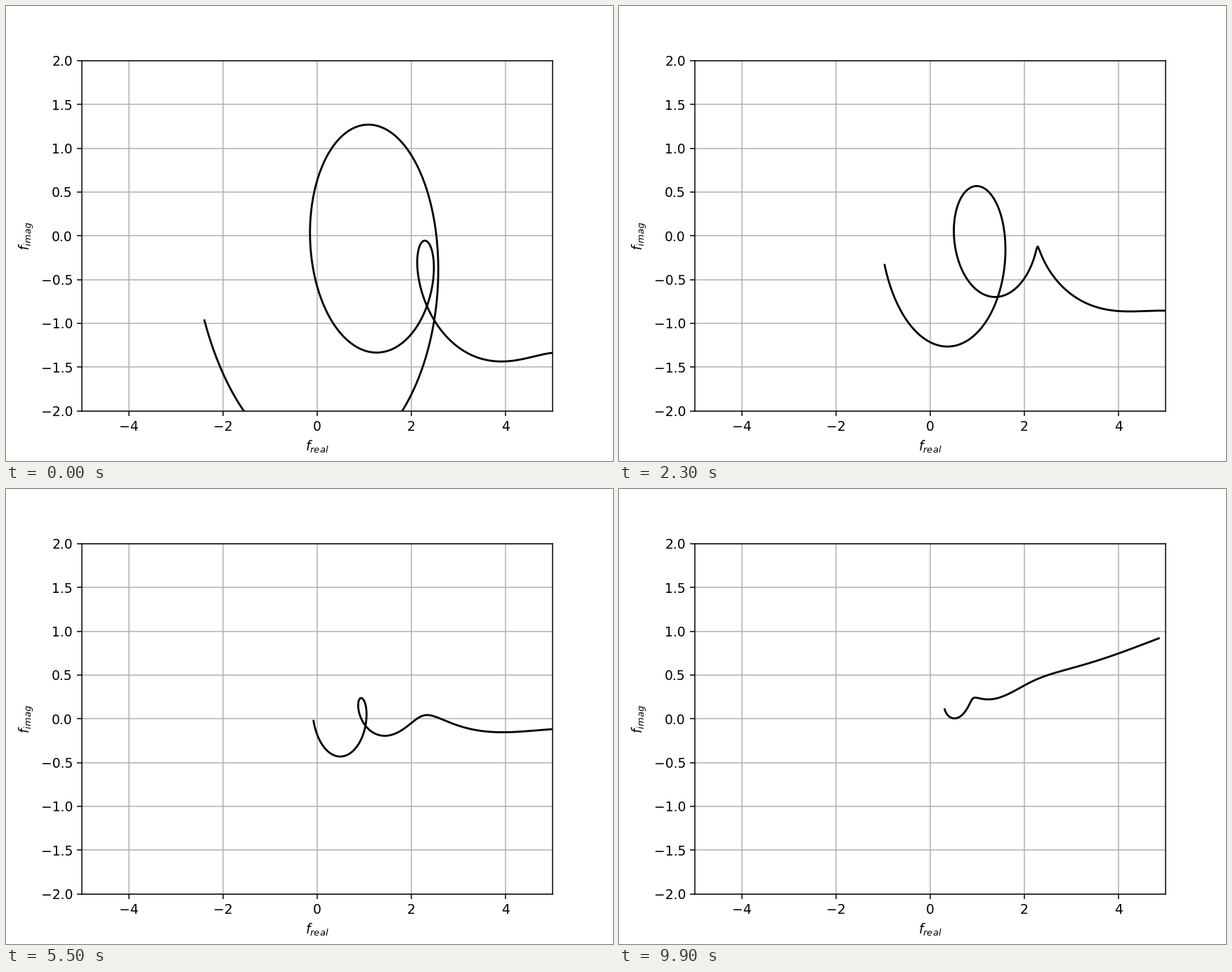
Write a matplotlib script that moves like this. It is 864 by 648 pixels and loops after 10000 ms.

```python
import numpy as np
import matplotlib.pyplot as plt
from matplotlib.animation import FuncAnimation

FRAMES = 100
INTERVAL = 100  # ms
PHI = (1 + np.sqrt(5)) / 2

x = np.arange(0, 5, 0.01)


def fibonacci(z):
    """Binet's formula continued to complex arguments."""
    return (PHI**z - np.exp(1j * np.pi * z) * PHI**(-z)) / np.sqrt(5)


fig, ax = plt.subplots(figsize=(6.4, 4.8), dpi=135)
ax.set_xlim(-5, 5)
ax.set_ylim(-2, 2)
ax.set_xlabel(r"$f_{real}$")
ax.set_ylabel(r"$f_{imag}$")
ax.grid(True)
line, = ax.plot([], [], color="black", lw=1.5)


def update(frame):
    # Each step shifts the horizontal line in the complex plane upwards.
    f = fibonacci(x + 1j * (-0.6 + 0.01 * frame))
    line.set_data(f.real, f.imag)
    return line,


anim = FuncAnimation(fig, update, frames=FRAMES, interval=INTERVAL,
                     repeat=True, repeat_delay=0)
plt.show()
```
